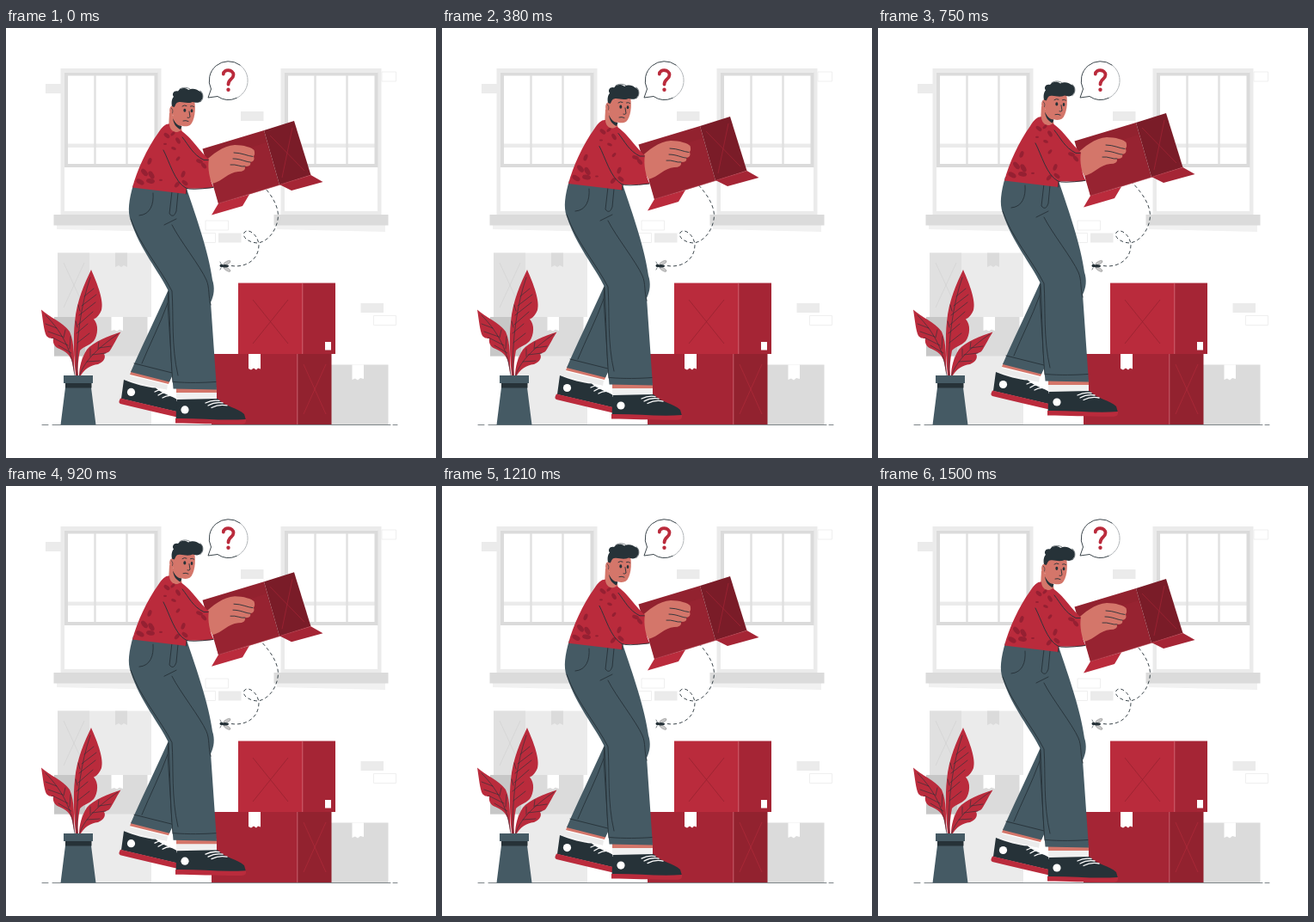
Write an HTML page that moves like this. It is 500 by 500 pixels and loops after 1.54 s.

```html
<!DOCTYPE html>
<html lang="en">
<head>
<meta charset="utf-8">
<title>Moving boxes</title>
<style>
html, body { margin: 0; width: 100%; height: 100%; overflow: hidden; background: #fff; }
svg { display: block; width: 100vw; height: 100vh; }
.line { fill: none; stroke: #263238; stroke-width: .9; stroke-linecap: round; stroke-linejoin: round; }
.thin { stroke-width: .6; }
.lace { stroke: #fff; stroke-width: 1.3; }
.brick { fill: #fff; stroke: #ebebeb; stroke-width: .8; }
.pale { fill: #ebebeb; }
.gray { fill: #dbdbdb; }
.white { fill: #fff; }
.red { fill: #ba2b3c; }
.mid { fill: #a52535; }
.deep { fill: #92222f; }
.dark { fill: #263238; }
.slate { fill: #455a64; }
.skin { fill: #d4766a; }
.cross { fill: none; stroke: #92222f; stroke-width: .7; }
.edge { fill: none; stroke: #e08a94; stroke-width: .6; }
</style>
</head>
<body>
<svg viewBox="0 0 500 500">
  <defs>
    <g id="window">
      <path class="pale" d="M63.5 47H180.5V217H63.5Z"/>
      <path class="white" d="M68 51H176V213H68Z"/>
      <path class="pale" d="M72 134.5H173V139H72Z"/>
      <path fill="none" stroke="#dbdbdb" stroke-width="4" d="M70 53.5H174.500V160H70Z"/>
      <path fill="none" stroke="#e0e0e0" stroke-width="2.400" d="M103.500 55V158M140.500 55V158"/>
      <path fill="#f1f1f1" d="M59 229H185V237L59 234Z"/>
      <path class="gray" d="M55.500 217H188.500V229.500H55.500Z"/>
    </g>
  </defs>

  <g id="room">
    <use href="#window"/>
    <use href="#window" x="256"/>
    <path class="pale" d="M46 65H64V76H46ZM273 97H299.500V108H273ZM247 238.500H273.500V249.500H247ZM412.500 320H439V331H412.500Z"/>
    <path class="brick" d="M437 51H453.500V62H437ZM232 224H258.500V235H232ZM217 238.500H243.500V249.500H217ZM427.500 334.500H453.500V345.500H427.500Z"/>

    <path class="pale" d="M60 261.500H169V336H60ZM88 381H169V461H88Z"/>
    <path fill="#e0e0e0" d="M60 261.500H97V336H60Z"/>
    <path fill="none" stroke="#d0d0d0" stroke-width=".6" d="M67 273L91 325M91 273L67 325"/>
    <path class="gray" d="M127 261.500H141V278L137 276L134 278L131 276L127 278ZM56 336H164.500V381.500H56Z"/>
    <path fill="#c7c7c7" d="M56 336H92V381.500H56Z"/>
    <path class="white" d="M122.500 336H136V352L132 350.500L129 352.500L126 351L122.500 352Z"/>

    <path class="gray" d="M378 391.500H444.500V461H378Z"/>
    <path class="white" d="M402.500 391.500H416V408L412 407L409 409.500L406 407.500L402.500 409Z"/>
    <path class="mid" d="M239 379H339V461H239ZM345 296.500H383V379H345Z"/>
    <path class="deep" d="M339 379H378.500V461H339Z"/>
    <path class="red" d="M270 296.500H345V379H270Z"/>
    <path class="cross" d="M287 316L328 367M328 316L287 367"/>
    <path class="cross" style="stroke:#b02a3a" d="M346 391L372 449M372 391L346 449"/>
    <path class="edge" d="M344.800 296.500V379M338.800 379V461"/>
    <path class="white" d="M371 365H378V374.500H371ZM282 379H296V396.500L293 395.500L291 397.500L288 395.500L285 397.500L282 396Z"/>

    <path class="line thin" d="M42 461.500H49M54 461.500H447M450 461.500H455"/>
  </g>

  <g id="plant">
    <path class="red" d="M81 404C79 385 78 358 80 342C82 317 92 296 99 281C107 299 114 318 111 328C109 333 106 337 102 338.500C108 345 107 357 102 364C96 370 89 371 86 375C84 385 83 395 84 404Z"/>
    <path class="red" d="M79.500 404C79 387 80 366 74 353C66 342 50 336 41 327.500C43 340 44 352 47 358C50 361 52 361 55 361C54 367 57 371 62 373C69 376 75 380 77 389Z"/>
    <path class="red" d="M85 404C85 395 88 383 94 374C101 365 120 358 133.500 353.500C128 362 125 369 121 375C119 378 115 378 114 379C117 384 112 389 107 391C98 392 91 397 87 404Z"/>
    <path class="line thin" d="M82.500 404C81 365 87 322 98 290M83 366L97 355M82 355L95 344M84 345L101 330M85 334L104 319M88 323L105 310M91 312L102 303M83 348L81 341M86 329L84 322
      M80 404C77 378 67 355 46 334M76 378L61 369M72 369L54 360M66 359L49 353M59 349L46 344M74 373L75 359M67 360L69 351
      M85.500 404C92 385 110 370 130 356M94 388L109 387M100 380L116 378M108 372L122 370M98 382L98 373M107 373L108 365"/>
    <path class="slate" d="M67 404H101V413H67ZM69 418H99L104.500 461.500H63.500Z"/>
    <path class="dark" d="M69 413H99.500V418.500H69Z"/>
  </g>

  <g id="bubble">
    <path class="white" d="M238.500 71A22.500 22.500 0 1 1 246 79.500L235 81Z"/>
    <path class="line" d="M272 43A22.500 22.500 0 0 0 238.500 71L235 81L246 79.500A22.500 22.500 0 0 0 268 81.500"/>
    <path class="line thin" stroke-dasharray="5 1" stroke-opacity=".6" d="M272 43A22.500 22.500 0 0 1 268 81.500"/>
    <path fill="none" stroke="#ba2b3c" stroke-width="3.800" stroke-linecap="round" d="M252.800 53.500C253 47.500 264.500 47.800 264.500 54.500C264.500 59.500 258.500 59.500 258.500 65.500"/>
    <circle class="red" cx="258.500" cy="71.700" r="2.200"/>
  </g>

  <g id="fly">
    <path class="line" stroke-dasharray="4 3" style="stroke-linecap:butt" d="M262 276.500C277 279 294 271 294 252C293 240 281 232 277 238C274 244 284 250 293 250C306 248 316 233 316.500 218C316 203 305 190 296 180"/>
    <g fill="#c7c7c7" stroke="#777" stroke-width=".4">
      <ellipse cx="257" cy="273" rx="4.500" ry="1.800" transform="rotate(-28 257 273)"/>
      <ellipse cx="257" cy="280.500" rx="4.500" ry="1.800" transform="rotate(32 257 280.500)"/>
    </g>
    <ellipse class="dark" cx="254.500" cy="276.800" rx="4.500" ry="1.700"/>
    <circle class="dark" cx="250.500" cy="276.300" r="1.900"/>
    <path class="line thin" d="M250 274L249 272M250 279L249 281"/>
  </g>

  <g data-lift="1">
    <g id="back-foot">
      <path class="white" d="M145 401L190 411L186 421L142 411Z"/>
      <path fill="#ebebeb" d="M143 404L188 415L187 421L141 410Z"/>
      <path class="dark" d="M137 409C149 414 164 418 174 418.500C181 425 193 428 199 432L202 447L134 431Z"/>
      <path class="red" d="M133 430.500L201 446.500V453C178 448 155 442 133 437Q131 436 131.500 434Z"/>
      <circle class="white" cx="145.500" cy="423.500" r="4.600"/>
      <path class="line lace" d="M173 423Q180 419 187 421.500M177 427Q184 422 192 424.500M182 430Q188 426 196 428"/>
    </g>
    <path class="skin" d="M146 398L191 409L189 414L144 403Z"/>
    <path class="slate" d="M189 304C176 333 157 372 145 400L190 411.500L198 395L200 320Z"/>
    <path class="line" d="M188 320C179 345 167 368 158 390M149 390L193 401M189 306L188 320L193 398"/>

    <g id="front-foot">
      <path class="skin" d="M198 418H245V425H198Z"/>
      <path fill="#f0f0f0" d="M198 424H245V434H198Z"/>
      <path class="dark" d="M198.500 432L246 431C254 440 270 442 277 449L279 456H197.500Z"/>
      <path class="red" d="M197 454C225 453.500 252 457 279 455Q280 460.500 274 460.800C246 461 222 459.500 197 459.500Z"/>
      <circle class="white" cx="208" cy="444" r="4.600"/>
      <path class="line lace" d="M232 436Q240 432 248 433.500M235 439Q243 434.500 252 436M239 441.500Q248 437 257 439"/>
    </g>
    <path class="slate" d="M148 182C143 200 141 213 145 224C156 258 178 283 189 306C191 340 191 380 194.500 419.500L245 420.500L238 319C242 311 243 302 240 293C236 262 222 222 210 187Z"/>
    <path class="line" d="M145 222C155 252 180 280 193 306C195 335 192 370 200 404M189 307C191 345 191 380 194 412M195 411.500C212 413 230 412.500 244 411.500
      M171 192C172 205 168 217 155 218M193 190L190 216Q195 222 198 213L200 192M184 229L198 222M193 229C202 247 226 277 233 293C237 302 235 312 238 322"/>
  </g>

  <g data-lift="1">
    <path class="deep" d="M228.500 140.500L300 119L318 182.500L247 204.500Z"/>
    <path fill="#7a1c28" d="M300 119L335 108L354.500 171L318 182.500Z"/>
    <path fill="#9c2433" d="M234 155L303 133L317 182L247 204Z" opacity=".6"/>
    <path class="red" d="M247 204L283 193.500L275 207L239 217.500Z"/>
    <path class="mid" d="M318 182L354.500 171L368.500 179L332 189Z"/>
    <path class="cross" style="stroke:#a52535" d="M307 125L347 166M333 116L321 174"/>
    <path class="edge" style="stroke:#b84753" d="M247 204L318 182.500L354.500 171"/>
    <path class="skin" d="M228 158C241 146 252 137 266 136C276 136 286 139 288.500 142Q290 147 288 149Q290 155 284 156Q286 161 278 161Q279 167 270 167C258 168 252 178 240 181Z"/>
    <path class="line" d="M265 145C274 145 281 149 287 149.500M264 152C273 152 279 156 284 156M261 159C268 158 273 162 278 161"/>
  </g>

  <g data-lift=".82">
    <path class="skin" d="M190 98L189 117L200 128L205 122L203 110Z"/>
  </g>

  <g data-lift=".9">
    <path class="red" d="M147 185.500C152 166 164 140 177 122C182 114 186 111 190 111.500C190 119 197 124 203 119C215 126 227 146 236 152.500C234 163 237 177 241.500 185.500C230 188 219 186 210 187L210 193Z"/>
    <g id="spots" fill="#952032"></g>
    <path class="line" d="M183 142C190 155 196 179 209 186Q213 189 241 185.500M205 127C213 137 217 147 230 153.500H235M210 187L209.500 193"/>
  </g>

  <g data-lift=".82">
    <path class="dark" d="M194 105C197 111 200 114 204.500 114L203 118C198 116 195 112 194 105Z"/>
    <path class="skin" d="M193 84H219C221 94 219.500 108 214 113C208 116.500 198 113 194.500 105Z"/>
    <ellipse class="skin" cx="193.500" cy="96" rx="3.400" ry="5.600"/>
    <path class="line thin" d="M192 93Q195 95 193.500 99"/>
    <path class="dark" d="M193 91C192 86 193 82 195 80C192 76 196 72 200 73.500C202 69.500 209 69 212 72C217 69.500 222 71 224 73C229 74 230 81 227 84C225 88 220 87 217 86C210 89 205 85 200 86.500C197 87 197 91 195.500 92Z"/>
    <path class="line thin" d="M202 71C206 68.500 211 69 214 71M226 73C230 76 230 83 226 86"/>
    <g class="dark">
      <ellipse cx="207.800" cy="95.800" rx="1.500" ry="2.100"/>
      <ellipse cx="216" cy="96.300" rx="1.300" ry="2"/>
    </g>
    <path class="line" d="M205 91Q207.500 89 210 90.500M214.500 91Q216.500 90 218.500 91.500M213 97L214 103.500Q213 105 211 104.300M206 108Q209 107 212 108.500"/>
  </g>
</svg>
<script>
const PERIOD = 1540, RISE = 9, LEAD = 30;

// Shirt pattern: x, y, size, tilt
const spots = [
  [187, 125, 4, 40], [194, 123, 3, -40], [200, 131, 4, 60], [195, 140, 3, 20], [185, 135, 2, 0],
  [167, 155, 4, -70], [161, 168, 5, 50], [169, 171, 5, 60], [156, 179, 5, 30], [168, 178, 5, 10],
  [180, 177, 2, 0], [200, 152, 3, -50], [206, 170, 4, -70], [199, 182, 4, -50], [208, 180, 4, 40],
  [225, 155, 4, 20], [230, 160, 4, 50]
];
document.getElementById("spots").innerHTML = spots.map(([x, y, size, tilt]) =>
  `<ellipse rx="${size}" ry="${size * .55}" transform="translate(${x} ${y}) rotate(${tilt})"/>`).join("");

const parts = document.querySelectorAll("[data-lift]");

function draw(now) {
  const height = RISE / 2 * (1 - Math.cos(2 * Math.PI * (now + LEAD) / PERIOD));
  for (const part of parts)
    part.setAttribute("transform", `translate(0 ${-height * part.dataset.lift})`);
}

const start = performance.now();
function tick() {
  draw(performance.now() - start);
  requestAnimationFrame(tick);
}
tick();
</script>
</body>
</html>
```
